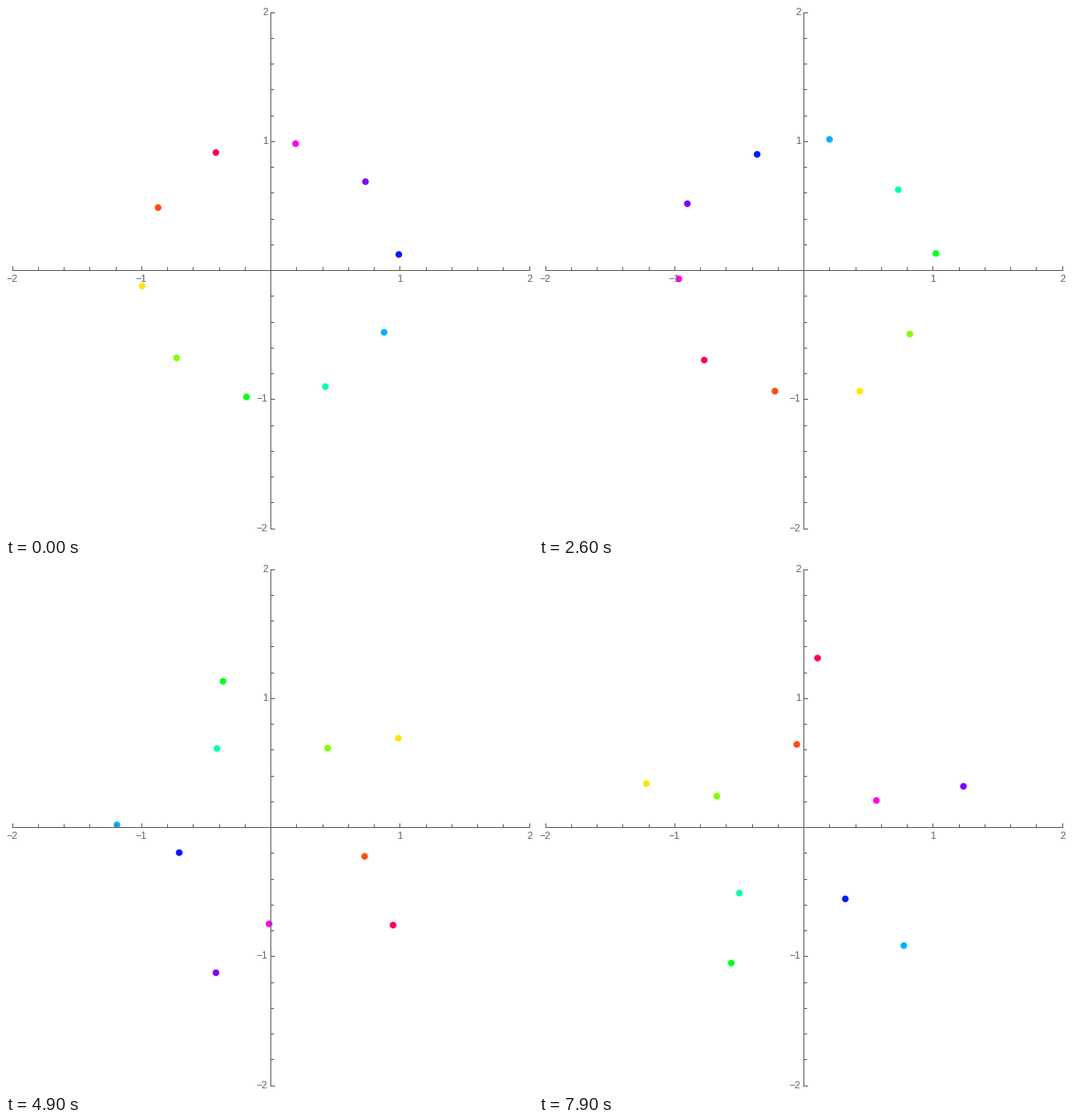
Recreate the animation shown at these times as a matplotlib script. Size 576 px wide and 579 px high, loop 8000 ms.

```python
import colorsys

import matplotlib.pyplot as plt
import numpy as np
from matplotlib.animation import FuncAnimation
from matplotlib.patches import Circle

W, H, DPI = 576, 579, 64
FRAMES, STEP = 80, 100
MID, UNIT = 289.5, 141.25
CX, CY = 289.3, 288.9  # centre of mass of the ring
GRAY = "0.4"
N = 10
END = FRAMES * STEP / 1000 - 0.1

fig = plt.figure(figsize=(W / DPI, H / DPI), dpi=DPI, facecolor="white")
ax = fig.add_axes([0, 0, 1, 1])
ax.set_xlim(0, W)
ax.set_ylim(H, 0)
ax.axis("off")


def line(x0, y0, x1, y1):
    ax.plot([x0, x1], [y0, y1], color=GRAY, lw=72 / DPI, snap=False,
            solid_capstyle="butt", zorder=3)


def label(x, y, value, ha):
    ax.text(x, y, str(value).replace("-", "\u2212"), ha=ha, va="baseline",
            family="Liberation Sans", size=11 * 72 / DPI, color=GRAY, zorder=3)


def draw_axes():
    line(7, MID, 573, MID)
    line(MID, 7, MID, 573)
    for i in range(-10, 11):
        if i == 0:
            continue
        pos = np.floor(MID + i * UNIT / 5) + 0.5
        size = 3 if i % 5 else 4
        line(pos, 289 - size, pos, 289)
        line(290, pos, 290 + size, pos)
        if i % 5 == 0:
            label(pos - 0.5, 302.2, i // 5, "center")
            label(286.3, pos + 2.8, -i // 5, "right")


def logistic(x):
    return 1 / (1 + np.exp(-x))


def ring(t):
    """Radius (px) and angle (rad) of every body at t seconds."""
    alpha = 36 * np.arange(N)
    outer = np.arange(N) % 2 == 1
    side = np.where(outer, 1, -1)

    # Odd bodies drift out and lead, even ones drift in and lag.
    split = 41.5 * np.sqrt(logistic(2 * (t - 4.71)))
    lead = 20.5 * logistic(1.1 * (t - 5.18))
    turn = 7.05 + 41 * t - 7.6 * logistic(1.3 * (t - 5.65))

    # A slowly growing wobble makes each pentagon lopsided.
    left = END - t
    swell = side * np.exp(-0.5 * left)
    r_phase = np.where(outer, -12, 17 + 35 * left)
    a_phase = np.where(outer, 11, -38 - 13 * left)
    r_wobble = 9 * swell * np.sin(np.radians(alpha + r_phase))
    a_wobble = -6.8 * swell * np.sin(np.radians(alpha + a_phase))

    radius = UNIT - 0.0036 * split**2 + side * split + r_wobble
    angle = alpha + turn + side * lead + a_wobble
    return radius, np.radians(angle)


draw_axes()
dots = [ax.add_patch(Circle((0, 0), 3.65, lw=0, zorder=2,
                            fc=colorsys.hsv_to_rgb((0.65 + k / N) % 1, 1, 1)))
        for k in range(N)]


def update(frame):
    r, a = ring(frame * STEP / 1000)
    for dot, x, y in zip(dots, CX + r * np.cos(a), CY - r * np.sin(a)):
        dot.center = x, y
    return dots


anim = FuncAnimation(fig, update, frames=FRAMES, interval=STEP,
                     repeat=True, repeat_delay=0, blit=False)
plt.show()
```
